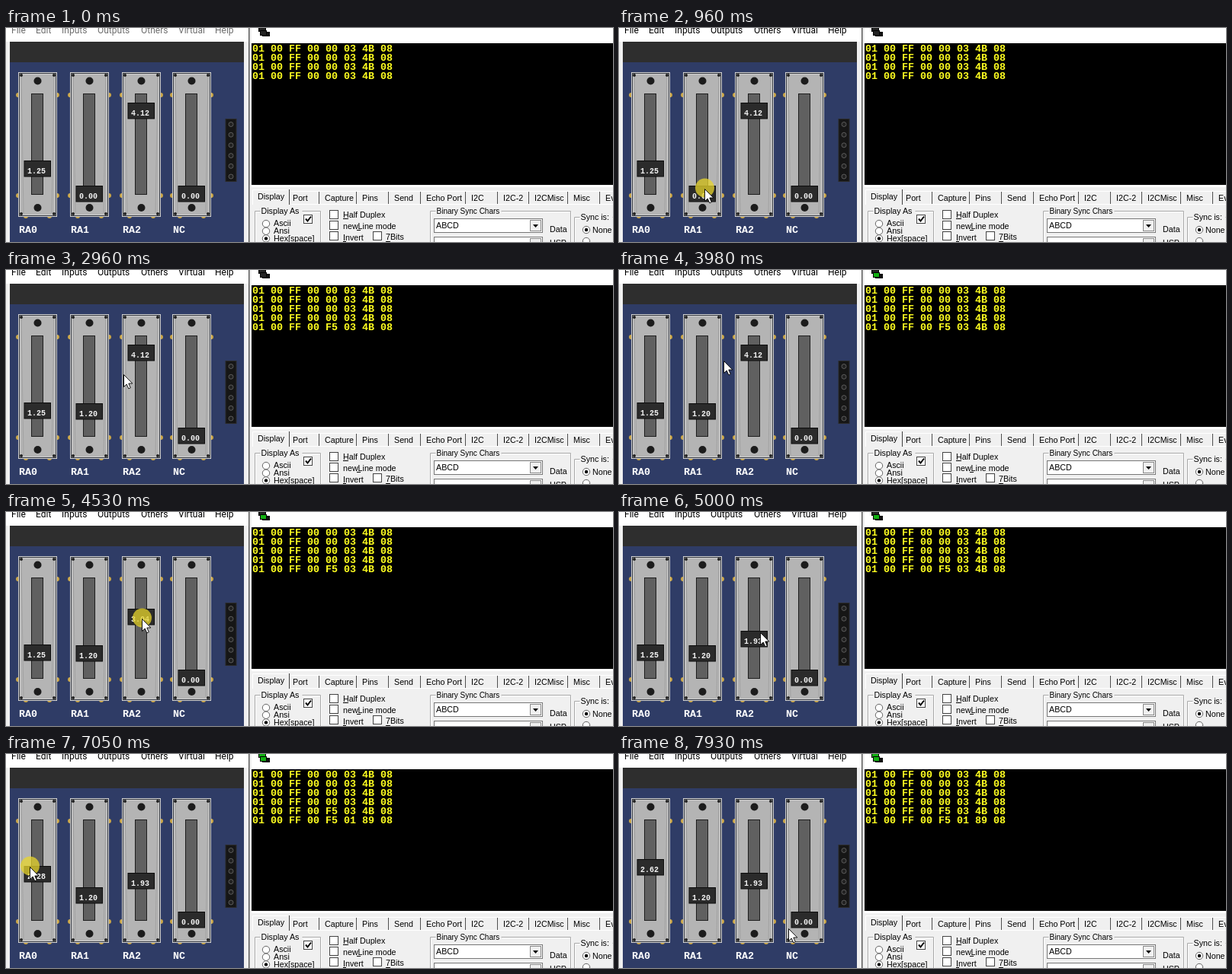
Recreate the animation shown at these times as an HTML page. Size 796 by 281 pixels, loop 8 s.

```html
<!DOCTYPE html>
<html>
<head>
<meta charset="utf-8">
<style>
html, body { margin: 0; width: 100%; height: 100%; overflow: hidden; background: #f0f0f0; }
svg { display: block; width: 796px; height: 281px; }
text { white-space: pre; }
.menu { font: 12px Roboto, sans-serif; }
.ui { font: 10.7px "Liberation Sans", Arial, sans-serif; fill: #000; }
.term { font: bold 13.33px "Liberation Mono", monospace; fill: #ffff20; }
.val { font: bold 10px "Liberation Mono", monospace; fill: #f4f4f4; }
.pin { font: bold 13.33px "Liberation Mono", monospace; fill: #fff; }
</style>
</head>
<body>
<svg id="stage" viewBox="0 0 796 281"></svg>
<script>
const LOOP = 8000;
const PX_PER_VOLT = 26.4;
const stage = document.getElementById('stage');

function add(tag, attrs, parent = stage) {
  const el = document.createElementNS('http://www.w3.org/2000/svg', tag);
  for (const k in attrs) el.setAttribute(k, attrs[k]);
  parent.appendChild(el);
  return el;
}
const rect = (x, y, width, height, fill, more, parent) =>
  add('rect', { x, y, width, height, fill, ...more }, parent);
const disc = (cx, cy, r, fill, more, parent) =>
  add('circle', { cx, cy, r, fill, ...more }, parent);
const path = (d, stroke, more, parent) =>
  add('path', { d, stroke, fill: 'none', ...more }, parent);
function label(x, y, str, cls = 'ui', more, parent) {
  const el = add('text', { x, y, class: cls, ...more }, parent);
  el.textContent = str;
  return el;
}

// Left window
rect(0, 0, 318, 18, '#fff');
const menu = add('g', {});
Object.entries({ File: 7, Edit: 39, Inputs: 73, Outputs: 120, Others: 177, Virtual: 226, Help: 274 })
  .forEach(([s, x]) => label(x, 7, s, 'menu', {}, menu));
rect(5, 18, 307, 28, '#2e2e2e');
rect(5, 45, 307, 236, '#2f3c66');

function board(x) {
  const g = add('g', { transform: `translate(${x})` });
  for (const py of [88, 220]) for (const px of [16, 67]) disc(px, py, 3, '#c9a548', {}, g);
  for (const px of [26, 57]) disc(px, 247, 3, '#c9a548', {}, g);
  rect(16.5, 58.5, 50, 189, '#30343c', { stroke: '#d4d4d4' }, g);
  rect(18.5, 60.5, 46, 185, '#b4b4b4', { stroke: '#cfcfcf' }, g);
  path('M20 63L23 243M63 63L60 243', '#a2a2a2', {}, g);
  for (const cx of [20, 63]) for (const cy of [62, 244]) disc(cx, cy, 2, '#222', {}, g);
  for (const cy of [69.5, 236]) disc(41.5, cy, 5, '#1c1c1c', {}, g);
  rect(33.5, 86.5, 15, 132, '#606060', { stroke: '#1e1e1e' }, g);
}

function knob(x) {
  const g = add('g', {});
  rect(x + 24, -10.5, 34.5, 20.5, '#2b2b2b', { stroke: '#0c0c0c' }, g);
  const txt = label(x + 28, 5.5, '', 'val', {}, g);
  return v => {
    g.setAttribute('transform', `translate(0 ${Math.round(217.8 - PX_PER_VOLT * v)})`);
    txt.textContent = v.toFixed(2);
  };
}

const offsets = [0, 68, 136, 202];
offsets.forEach(board);
['RA0', 'RA1', 'RA2', 'NC'].forEach((s, i) => label(17 + offsets[i], 269, s, 'pin'));
const knobs = offsets.map(knob);

rect(288, 119.5, 14, 82, '#161616', { stroke: '#2b2b2b' });
for (let i = 0; i < 6; i++) disc(295, 126.5 + i * 13.7, 3, '#222', { stroke: '#5a5a5a' });

// Right window
rect(312, 18, 6, 263, '#f0f0f0');
rect(318, 0, 478, 281, '#f0f0f0');
rect(318, 0, 1.5, 281, '#5a5a5a');
rect(322, 0, 474, 20, '#fff');
rect(322, 20, 474, 186, '#000');
rect(322, 206, 474, 3, '#fff');

const icon = add('g', { stroke: '#000' });
const upper = rect(331.5, -3.5, 9, 8, '#222', {}, icon);
rect(336.5, 5.5, 9, 5, '#111', {}, icon);
const lower = rect(333.5, 3.5, 8, 6, '#222', {}, icon);

const rows = [];
function log(time, bytes) {
  const el = label(323, 31 + rows.length * 12, `01 00 FF 00 ${bytes} 08`, 'term');
  rows.push({ el, time });
}
for (let i = 0; i < 4; i++) log(0, '00 03 4B');
log(2960, 'F5 03 4B');
log(6300, 'F5 01 89');

// Tabs
path('M371 214.5H796M371 231.5H796', '#fff');
rect(323, 211, 48, 21, '#f0f0f0');
path('M323.5 232V212.5H370', '#fff');
path('M371.5 212V232', '#404040');
label(330, 225, 'Display');
Object.entries({
  Port: 376, Capture: 418, Pins: 467, Send: 509, 'Echo Port': 551,
  I2C: 610, 'I2C-2': 652, I2CMisc: 693, Misc: 744, Ev: 786
}).forEach(([s, x]) => {
  label(x, 227, s);
  if (x > 376) path(`M${x - 7.5} 215V231`, '#505050');
});

// Form controls
function group(x, y, title, width, end) {
  const d = `M${x + 7} ${y}H${x}V281M${x + width + 12} ${y}H${end}V281`;
  path(d, '#fff', { transform: 'translate(1 1)' });
  path(d, '#a8a8a8');
  label(x + 8, y + 3, title, 'ui', width > 75 ? { style: 'font-size:10px' } : {});
}
function radio(x, y, on) {
  disc(x, y, 4.7, '#fff', { stroke: '#666' });
  if (on) disc(x, y, 2.2, '#000');
}
const box = (x, y) => rect(x + .5, y + .5, 11, 11, '#fff', { stroke: '#444' });
function combo(y) {
  rect(561.5, y + .5, 142, 18, '#fff', { stroke: '#777' });
  rect(687.5, y + 2.5, 14, 14, '#f0f0f0', { stroke: '#888' });
  add('path', { d: `M691 ${y + 8}h7l-3.5 4z`, fill: '#000' });
}

group(326.5, 240.5, 'Display As', 50, 412.5);
['Ascii', 'Ansi', 'Hex[space]'].forEach((s, i) => {
  radio(341, 257 + i * 9.7, i === 2);
  label(351, 260 + i * 10, s);
});
box(390, 245);
path('M393 250.5L395.5 253.5L400 247.5', '#000', { 'stroke-width': 2 });

['Half Duplex', 'newLine mode', 'Invert'].forEach((s, i) => {
  box(424, 239 + i * 14);
  label(442, 248.5 + i * 15, s);
});
box(481, 267);
label(498, 278, '7Bits');
path('M442 280.5h4M498 280.5h6M460 265.5h5M442 250.5h7', '#000');

group(556.5, 240.5, 'Binary Sync Chars', 81, 740.5);
combo(250);
combo(274);
label(564, 263, 'ABCD');
label(713, 267.5, 'Data');
label(713, 286, 'USP');

group(745.5, 248.5, 'Sync is:', 38, 800);
radio(761, 265, true);
radio(761, 280, false);
label(769, 269, 'None');

// Pointer: each leg runs from where the last one ended to (x, y)
const halo = disc(0, 0, 12.5, '#e8d62c', { opacity: .75 });
const arrow = add('path', {
  d: 'M.5.5V16.5L4.2 13L6.8 18.8L9.3 17.7L6.8 12H11.8Z', fill: '#fff', stroke: '#000', 'stroke-width': .9
});
const home = { x: 535, y: 128 };
const legs = [
  [130, 700, 56, 226], [700, 960, 113, 210.68], [1080, 1580, 115, 179], [1800, 2610, 155, 137],
  [2980, 3170, 147, 131], [3370, 3580, 132, 115], [3780, 3980, 138, 119], [3980, 4200, 177, 112],
  [4270, 4800, 182, 169.82], [4850, 5000, 186, 158], [5050, 5350, 81, 210], [5400, 5900, 43, 184],
  [6250, 6570, 43, 175], [6840, 7120, 29, 138.83], [7340, 7930, 223, 229]
];
const drags = [
  { knob: 1, from: 960, to: 1780 },
  { knob: 2, from: 4230, to: 4830 },
  { knob: 0, from: 6840, to: 7320 }
];
const volts = [1.25, 0, 4.12, 0];

function pointer(t) {
  let { x, y } = home;
  for (const [from, to, px, py] of legs) {
    const u = Math.min(1, Math.max(0, (t - from) / (to - from)));
    x += (px - x) * u;
    y += (py - y) * u;
  }
  return { x, y };
}

// A held knob follows the pointer's height
function level(i, t) {
  const d = drags.find(d => d.knob === i);
  if (!d || t < d.from) return volts[i];
  return volts[i] + (pointer(d.from).y - pointer(Math.min(t, d.to)).y) / PX_PER_VOLT;
}

const show = (el, on) => el.setAttribute('visibility', on ? 'visible' : 'hidden');
const place = (el, x, y) => el.setAttribute('transform', `translate(${x} ${y})`);

function draw(t) {
  const p = pointer(t), x = Math.round(p.x), y = Math.round(p.y);
  place(arrow, x - 1, y);
  place(halo, x - .5, y - 1);
  show(arrow, t >= 130);
  show(halo, drags.some(d => t >= d.from && t < d.to));
  menu.setAttribute('fill', t < 960 ? '#6d6d6d' : '#000');
  knobs.forEach((set, i) => set(level(i, t)));
  rows.forEach(r => show(r.el, t >= r.time));
  lower.setAttribute('fill', t < 3100 ? '#222' : '#12b012');
  upper.setAttribute('fill', t < 6300 ? '#222' : '#12b012');
}

const start = performance.now();
function tick() {
  draw((performance.now() - start) % LOOP);
  requestAnimationFrame(tick);
}
tick();
</script>
</body>
</html>
```
